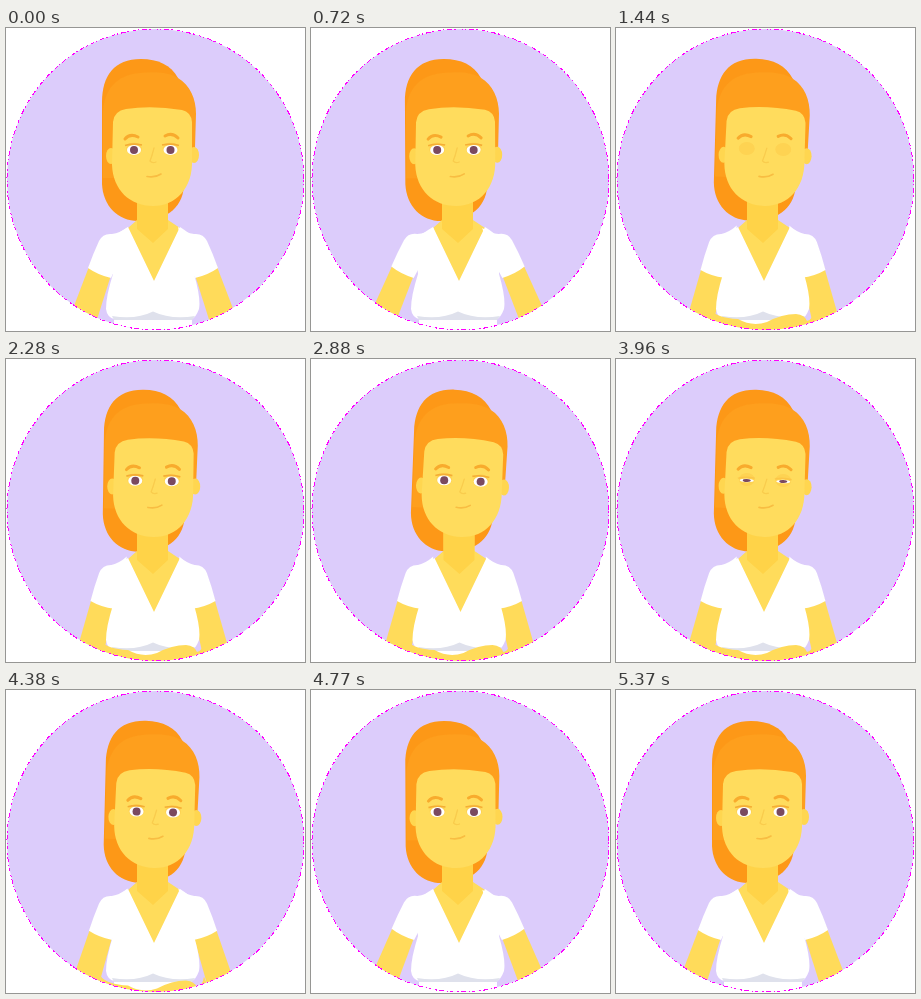
An HTML page for the animation above (5.4 s loop, 299x303 px).

```html
<!DOCTYPE html>
<html lang="en">
<head>
<meta charset="utf-8">
<title>Portrait loop</title>
<style>
html, body { margin: 0; width: 299px; height: 303px; overflow: hidden; background: #fff; }
svg { display: block; }
</style>
</head>
<body>
<svg width="299" height="303" viewBox="0 0 299 303">
  <defs>
    <clipPath id="disc"><ellipse cx="149.5" cy="151.5" rx="148.5" ry="150.5"/></clipPath>
    <g id="arm">
      <path d="M84 236 L63 291 L88 301 L106 244Z" fill="#ffdb5a"/>
      <path d="M122 199 Q114 205 106 206 Q97 205 93 213 Q87 226 82 240 Q92 247 105 250 L116 226Z" fill="#fff"/>
    </g>
    <g id="eye">
      <ellipse rx="7" ry="5" fill="#fff"/>
      <circle r="4" fill="#7a4a60"/>
    </g>
  </defs>
  <g clip-path="url(#disc)">
    <rect width="299" height="303" fill="#dcccfb"/>
    <path id="backHair" d="M135 31 C108 31 96 48 96 74 V156 C97 178 112 193 132 193 C158 193 176 182 178 158 L172 50 C165 37 152 31 135 31Z" fill="#fd9817"/>
    <g id="body">
      <path d="M131 160 H162 V192 L174 200 L148 254 L122 200 L131 192Z" fill="#ffdc5b"/>
      <path d="M131 160 H162 V201 L147 215 L131 201Z" fill="#ffd348"/>
      <use id="armL" href="#arm"/>
      <g transform="translate(294) scale(-1 1)"><use id="armR" href="#arm"/></g>
      <path d="M122 199 L148 253 L174 199 Q185 206 190 212 L188 246 Q195 270 193 281 Q190 289 186 291 V303 H108 V291 Q101 289 100 281 Q100 268 107 246 L104 212 Q110 206 122 199Z" fill="#fff"/>
      <path d="M106 288 Q130 292 147 283.5 Q165 292 189 288 L186 292 H108Z" fill="#dfe1ec"/>
      <path id="hands" d="M95 282 Q101 290 122 291 Q136 299 151 294 Q166 286 180 286 Q189 287 191 293 Q196 293 198 282 L222 345 H78Z" fill="#ffdb5a"/>
    </g>
    <g id="head">
      <path d="M97 150 V88 C97 62 110 47 134 45 C151 43 164 45 172 50 C184 57 190 71 190 86 L189 120 H180 L172 86 H116 L108 150Z" fill="#fe9f1d"/>
      <ellipse cx="105" cy="128" rx="5" ry="8" fill="#ffd650"/>
      <ellipse cx="188" cy="127" rx="5" ry="8" fill="#ffd650"/>
      <path d="M107 94 Q108 83 120 81 Q146 77 176 82 Q185 84 186 94 V132 C187 160 170 178 147 178 C124 178 107 162 106 137Z" fill="#ffdc5d"/>
      <g fill="none" stroke-linecap="round">
        <path d="M119 111 Q124 105 132 109 M159 108 Q166 104 172 110" stroke="#f8ab2d" stroke-width="3"/>
        <path d="M148 120 Q146 128 144 133 Q146 135.5 150 134" stroke="#f9cc4d" stroke-width="1.3"/>
        <path d="M141 148.500 Q149 150 155 146" stroke="#f8bd42" stroke-width="1.6"/>
      </g>
      <g fill="#fed352">
        <ellipse cx="128" cy="121" rx="8" ry="6.5"/>
        <ellipse cx="164.5" cy="121" rx="8" ry="6.5"/>
      </g>
      <use id="eyeL" href="#eye"/>
      <use id="eyeR" href="#eye"/>
      <path id="lids" d="M119 117.5 Q127 115 136 117 M156 117 Q165 115 173 117.5" fill="none" stroke="#f5ad34" stroke-width="1.6"/>
    </g>
  </g>
  <ellipse cx="149.5" cy="151.5" rx="148.5" ry="150.5" fill="none" stroke="#f0f" stroke-dasharray="3 2 1 3 5 2 2 4" shape-rendering="crispEdges"/>
</svg>
<script>
const LOOP = 5400;
const $ = id => document.getElementById(id);
const set = (id, value) => $(id).setAttribute('transform', value);
const clamp = x => Math.min(1, Math.max(0, x));

// Eased 0 to 1 between times a and b.
function step(t, a, b) {
  const p = clamp((t - a) / (b - a));
  return p * p * (3 - 2 * p);
}

const lidGap = (t, mid) => clamp((Math.abs(t - mid) - 20) / 60);

function draw(t) {
  // The arms fold in the first half and unfold in mirror order.
  const u = Math.min(t, LOOP - t);
  const out = step(u, 390, 720) - step(u, 720, 1020);
  const turn = step(u, 720, 1080);
  const fold = step(u, 720, 1440);
  const rise = step(u, 640, 1120);
  const glance = step(t, 1800, 2280) - step(t, 2400, 2910);
  const look = step(t, 2400, 2910) - step(t, 2970, 3570);
  const eye = Math.min(lidGap(t, 1440), lidGap(t, 3920));

  const dx = turn + 1.8 * look - 1.5 * out - 0.6 * glance;
  const tilt = 1.6 * turn + 0.6 * look - 0.3 * out - 0.8 * glance;
  const head = `translate(${dx}) rotate(${tilt} 147 185)`;
  const arm = `rotate(${3.5 * out - 5 * fold} 105 212)`;

  set('body', `translate(${1.5 * look})`);
  set('backHair', head);
  set('head', head);
  set('armL', arm);
  set('armR', arm);
  set('hands', `translate(0 ${40 * (1 - rise)})`);
  set('eyeL', `translate(128 122) scale(1 ${eye})`);
  set('eyeR', `translate(164.5 122) scale(1 ${eye})`);
  set('lids', `translate(0 ${4 * (1 - eye)})`);
  $('lids').setAttribute('opacity', eye);
}

function tick() {
  draw(performance.now() % LOOP);
  requestAnimationFrame(tick);
}
tick();
</script>
</body>
</html>
```
